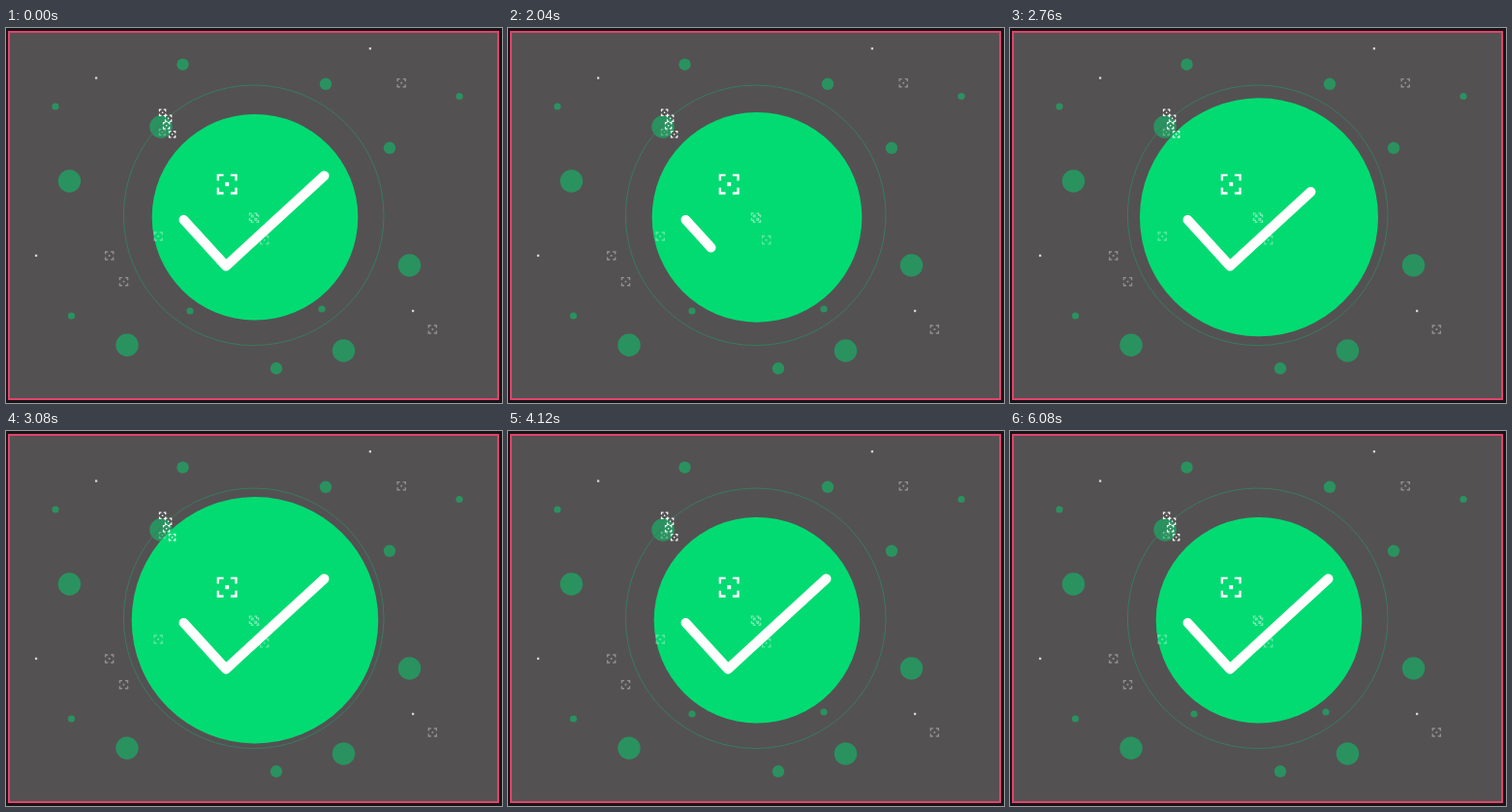
Recreate the animation shown at these times as an HTML page. Size 512 px wide and 387 px high, loop 6.12 s.

```html
<!DOCTYPE html>
<html lang="en">
<head>
<meta charset="utf-8">
<title>Success check</title>
<style>
  html, body { margin: 0; width: 100%; height: 100%; overflow: hidden; background: #181417; }
  svg { display: block; width: 100vw; height: 100vh; }
</style>
</head>
<body>
<svg viewBox="0 0 512 387">
  <rect x="3" y="4" width="505" height="379" fill="#545153" stroke="#e0446a" stroke-width="2"/>
  <g id="dots" fill="#2a925f"></g>
  <circle cx="255.7" cy="193.3" r="134.3" fill="none" stroke="#35805f" stroke-width="0.9"/>
  <circle id="disc" cx="257" cy="195.3" fill="#02db72"/>
  <g id="marks" fill="none" stroke="#fff"></g>
  <path id="check" d="M183.5 198L227 245.7L328.5 152.5" fill="none" stroke="#fff"
        stroke-width="10" stroke-linecap="round" stroke-linejoin="round"/>
</svg>
<script>
const LOOP = 6120, STEP = 40;
const REST_RADIUS = 106.3, PEAK_RADIUS = 1.2 * REST_RADIUS;
const byId = id => document.getElementById(id);
const disc = byId('disc'), check = byId('check');
const checkLength = check.getTotalLength();

function add(parent, tag, attrs) {
  const node = document.createElementNS('http://www.w3.org/2000/svg', tag);
  for (const key in attrs) node.setAttribute(key, attrs[key]);
  byId(parent).appendChild(node);
}

// Calls draw(x, y) for each point of "x,y x,y ..."
function eachPoint(points, draw) {
  points.split(' ').forEach(point => draw(...point.split(',').map(Number)));
}

function square(x, y, size, opacity) {
  add('marks', 'rect', {
    x: x - size / 2, y: y - size / 2, width: size, height: size,
    fill: '#fff', stroke: 'none', opacity
  });
}

// Four corner brackets around a small square
function focusMark(x, y, size, opacity) {
  const width = 0.6 + size * 0.085;
  const half = (size - width) / 2, arm = size * 0.27;
  let d = '';
  for (const sx of [-1, 1]) for (const sy of [-1, 1]) {
    d += `M${x + sx * half} ${y + sy * (half - arm)}V${y + sy * half}H${x + sx * (half - arm)}`;
  }
  add('marks', 'path', { d, 'stroke-width': width, opacity });
  square(x, y, size * 0.19, opacity);
}

function buildScene() {
  const dots = r => (cx, cy) => add('dots', 'circle', { cx, cy, r });
  eachPoint('160,102 65.5,158 416.5,245 125,327.3 348.5,333', dots(11.7));
  eachPoint('182.5,37.6 330,57.8 396,123.8 279,351.3', dots(6.2));
  eachPoint('468,70.5 51,81 67.5,297 190,292 326,290', dots(3.6));

  focusMark(228.2, 161.2, 21, 1);
  eachPoint('408.2,56.7 106.7,235 121.5,261.7 440.3,311 157.2,215 266.7,218.8',
    (x, y) => focusMark(x, y, 9.5, 0.36));

  // Overlapping pair in the middle
  for (const shift of [-1, 1]) focusMark(256 + shift, 195.7 + shift, 8.5, 0.45);

  // Zigzag trail over the upper left dot
  for (let i = 0; i < 4; i++) {
    focusMark(161.6 + 2 * i + 4 * (i % 2), 87.3 + 5.2 * i + 0.75 * i * i, 7.5, 0.95);
  }
  focusMark(161.3, 107.5, 7, 0.3);

  eachPoint('375.9,21.2 93.1,51.6 31.1,234.9 420.1,292', (x, y) => square(x, y, 2.3, 0.75));
}

function ease(time, from, to) {
  const x = Math.min(1, Math.max(0, (time - from) / (to - from)));
  return x * x * (3 - 2 * x);
}

function render(time) {
  const swell = ease(time, 1770, 3180) - ease(time, 3180, 3520);
  disc.setAttribute('r', REST_RADIUS + (PEAK_RADIUS - REST_RADIUS) * swell);

  // The tick is cleared at once, then drawn again
  const drawn = time < 1640 ? 1 : ease(time, 1640, 3070);
  check.setAttribute('visibility', drawn > 0 ? 'visible' : 'hidden');
  check.setAttribute('stroke-dasharray',
    drawn < 1 ? `${drawn * checkLength} ${checkLength * 2}` : 'none');
}

const start = performance.now();
function tick() {
  const elapsed = (performance.now() - start) % LOOP;
  render(Math.floor(elapsed / STEP) * STEP);
  requestAnimationFrame(tick);
}

buildScene();
render(0);
requestAnimationFrame(tick);
</script>
</body>
</html>
```
